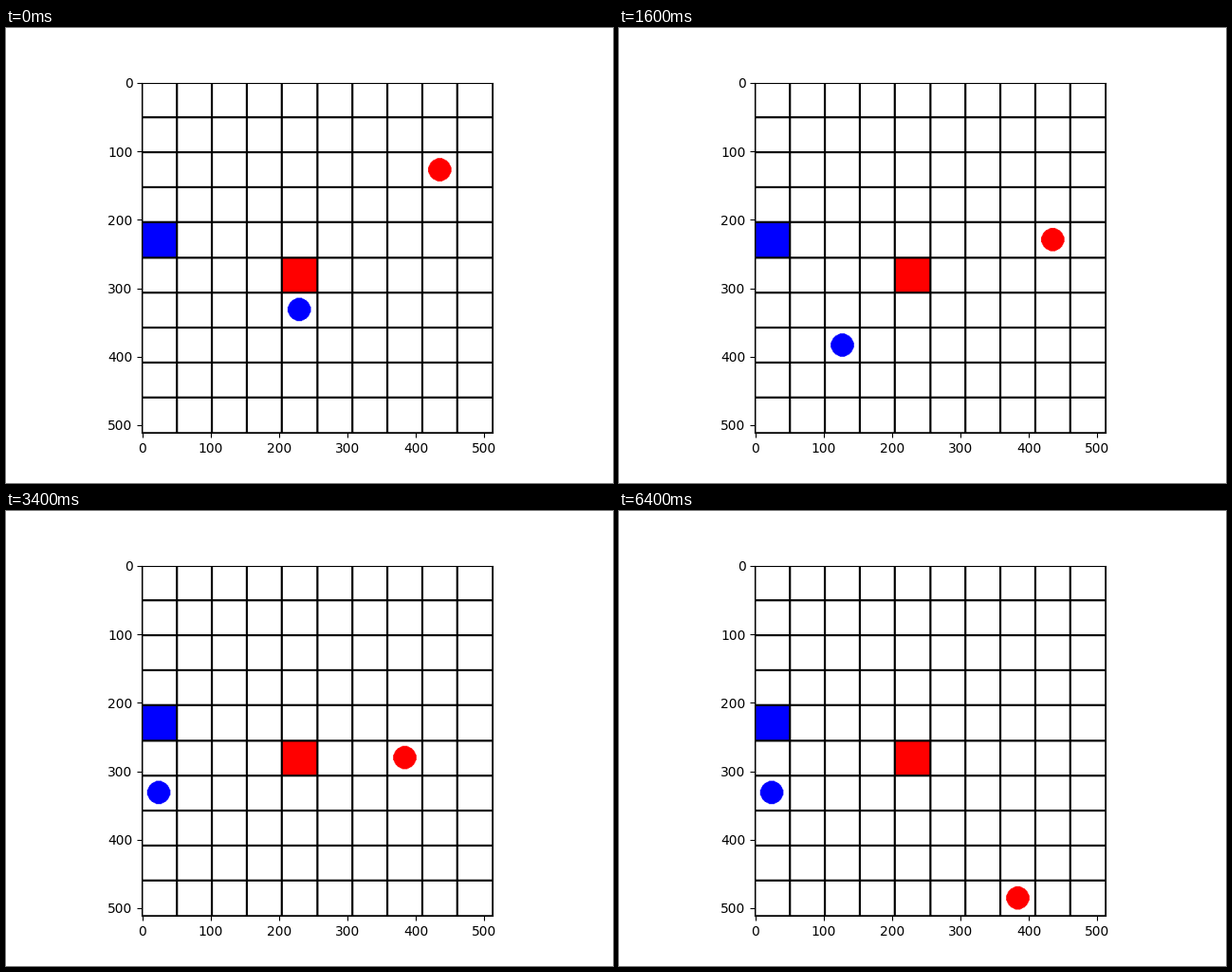
A matplotlib script for the animation above (8000 ms loop, 640 by 480 pixels).

```python
from itertools import cycle

import numpy as np
import matplotlib.pyplot as plt
from matplotlib.animation import FuncAnimation

SIZE, CELLS = 512, 10
CELL = SIZE / CELLS
RADIUS = int(CELL / 3)
STEP_MS, FRAMES = 200, 40

RED, BLUE = (255, 0, 0), (0, 0, 255)
MOVES = {"L": (-1, 0), "R": (1, 0), "U": (0, -1), "D": (0, 1)}

ys, xs = np.mgrid[:SIZE, :SIZE] + 0.5


def walk(cell, moves, first, every, ms):
    """Take one move per period; the walls of the board stop the agent."""
    for _, move in zip(range(first, ms + 1, every), cycle(moves)):
        cell = np.clip(np.add(cell, MOVES[move]), 0, CELLS - 1)
    return cell


def fill_cell(img, col, row, color):
    x, y, side = int(col * CELL), int(row * CELL), int(CELL)
    img[y:y + side, x:x + side] = color


def fill_disc(img, cell, color):
    cx, cy = (int((c + 0.5) * CELL) for c in cell)
    dx, dy = abs(xs - cx), abs(ys - cy)
    # midpoint-circle rule: the shorter offset counts to the pixel's outer edge
    near, far = np.minimum(dx, dy) + 0.5, np.maximum(dx, dy)
    img[near ** 2 + far ** 2 < RADIUS ** 2] = color


def draw_grid(img):
    for i in range(CELLS + 1):
        p = int(i * CELL)
        line = slice(max(p - 1, 0), p + 2)
        img[line] = 0
        img[:, line] = 0


def render(ms):
    img = np.full((SIZE, SIZE, 3), 255, np.uint8)
    fill_cell(img, 4, 5, RED)
    fill_cell(img, 0, 4, BLUE)
    fill_disc(img, walk((8, 2), "DDDLDDDD", 600, 800, ms), RED)
    fill_disc(img, walk((4, 6), "LLDLUL", 400, 600, ms), BLUE)
    draw_grid(img)
    return img


fig, ax = plt.subplots(figsize=(6.4, 4.8), dpi=100)
board = ax.imshow(render(0))


def update(frame):
    board.set_data(render(frame * STEP_MS))
    return [board]


anim = FuncAnimation(fig, update, frames=FRAMES, interval=STEP_MS, repeat=True)
plt.show()
```
